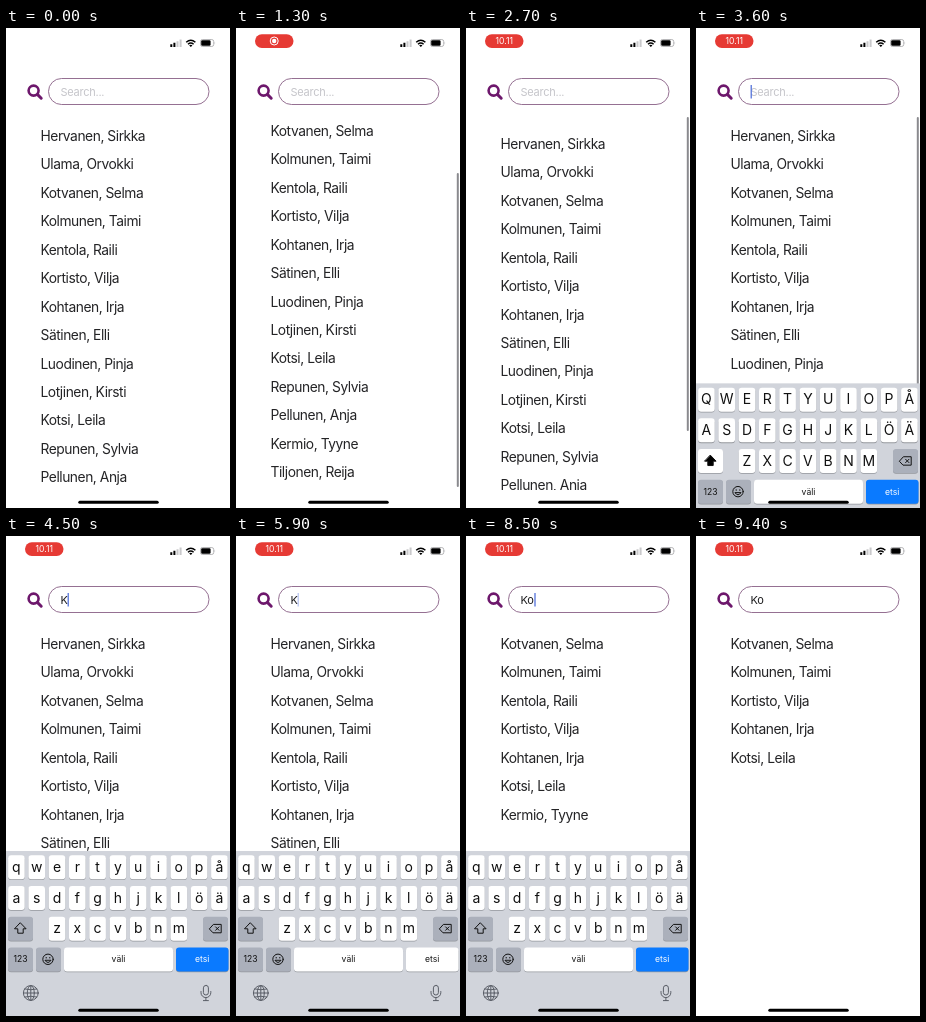
An HTML page for the animation above (9.5 s loop, 224 by 480 pixels).

```html
<!DOCTYPE html>
<html lang="fi">
<head>
<meta charset="utf-8">
<title>Name search</title>
<style>
  html, body { margin: 0; width: 100%; height: 100%; overflow: hidden; background: #fff; }
  svg { display: block; }
  #stage { width: 100vw; height: 100vh; font-family: Inter, Roboto, sans-serif; }
  #list { font-size: 13.8px; letter-spacing: -.45px; fill: #242426; }
  #query { font-size: 11px; letter-spacing: -.25px; }
  .center { text-anchor: middle; }
  .letter { font-size: 14px; fill: #111; }
  .label { font-size: 8.6px; fill: #111; }
  .line { fill: none; stroke: #111; stroke-linecap: round; stroke-linejoin: round; }
</style>
</head>
<body>
<svg id="stage" viewBox="0 0 224 480">
  <rect width="224" height="480" fill="#fff"/>

  <svg y="87.6" width="224" height="374.4" viewBox="0 87.6 224 374.4"><g id="list"></g></svg>
  <rect id="bar" x="220.8" width="2" rx="1" fill="#8a8a8e"/>

  <g fill="none" stroke="#6d176c">
    <circle cx="27.6" cy="62.6" r="5" stroke-width="2.6"/>
    <path d="M31.6 66.6l3.6 3.6" stroke-width="3" stroke-linecap="round"/>
    <rect x="42.5" y="50.5" width="160.5" height="26" rx="13" stroke="#8a6086" stroke-width=".9"/>
  </g>
  <text id="query" x="54.5" y="67.7"></text>
  <rect id="cursor" y="57" width="1.2" height="13.5" fill="#4668d8"/>

  <g id="pill">
    <rect x="19" y="6.3" width="38.5" height="13.6" rx="6.8" fill="#e63a34"/>
    <g id="recording" fill="#fff">
      <circle cx="38.2" cy="13" r="4" fill="none" stroke="#fff"/>
      <circle cx="38.2" cy="13" r="2.2"/>
    </g>
    <text id="clock" class="center" x="38.2" y="16.3" font-size="8.6" fill="#fff">10.11</text>
  </g>

  <g>
    <path d="M164.3 16.2h2v2.8h-2zM167.4 14.8h2v4.2h-2z"/>
    <path d="M170.5 13.2h2v5.8h-2zM173.6 11.6h2v7.4h-2z" fill="#c9c9cb"/>
    <g fill="none" stroke="#000" stroke-width="1.5">
      <path d="M180.2 14.2q4.6-4 9.2 0M182 16.2q2.8-2.4 5.6 0"/>
    </g>
    <path d="M183.2 17.4q1.6-1.3 3.2 0l-1.6 1.7z"/>
    <rect x="194.5" y="11.5" width="13.2" height="7" rx="2" fill="none" stroke="#a5a5a8" stroke-width=".8"/>
    <rect x="195.2" y="12.2" width="9.4" height="5.6" rx="1.2"/>
    <path d="M208.6 13.7q1.2 1.3 0 2.6z" fill="#a5a5a8"/>
  </g>

  <g id="keyboard">
    <rect y="315" width="224" height="175" fill="#d1d4db"/>
    <g id="keys"></g>
    <path id="shift" class="line" d="M14.5 387l5.6 5.8h-2.9v4.4h-5.4v-4.4h-2.9z" stroke-width="1"/>
    <g class="line" stroke-width="1">
      <path d="M203.6 392.6l3.8-4.2h7.8v8.4h-7.8zM209.6 390.9l3.4 3.4m0-3.4l-3.4 3.4"/>
      <circle cx="42" cy="423.3" r="5.2"/>
      <path d="M39.2 424.6q2.8 4 5.6 0zM40.2 421.4v.6M43.8 421.4v.6"/>
    </g>
    <g class="line" stroke-width="1" style="stroke:#5b5f68">
      <circle cx="24.8" cy="457" r="7.4"/>
      <ellipse cx="24.8" cy="457" rx="3.5" ry="7.4"/>
      <path d="M17.4 457h14.8M24.8 449.6v14.8M18.8 453q6 1.6 12 0M18.8 461q6-1.6 12 0"/>
      <rect x="197.4" y="449.4" width="5" height="9.6" rx="2.5"/>
      <path d="M195 455.5v1.2a4.9 4.9 0 0 0 9.8 0v-1.2M199.9 461.6v3M197.4 464.6h5"/>
    </g>
  </g>
  <rect x="72.3" y="472.7" width="80.4" height="3" rx="1.5"/>
</svg>

<script>
const LOOP = 9500;
const MAX_SCROLL = 54;
const TRAVEL = 172;
const names = [
  "Hervanen, Sirkka", "Ulama, Orvokki", "Kotvanen, Selma", "Kolmunen, Taimi",
  "Kentola, Raili", "Kortisto, Vilja", "Kohtanen, Irja", "Sätinen, Elli",
  "Luodinen, Pinja", "Lotjinen, Kirsti", "Kotsi, Leila", "Repunen, Sylvia",
  "Pellunen, Anja", "Kermio, Tyyne", "Tiljonen, Reija"
];
// Each visit to the search field: focus, typing, search key, resulting text.
const visits = [
  { focus: 3485, type: 4330, press: 5830, submit: 5950, text: "K" },
  { focus: 7565, type: 8430, press: 8840, submit: 8940, text: "Ko" }
];
const scrollKeys = [[1030, 0], [1300, 62], [1720, 54], [2280, 54], [2680, -8], [3050, 0]];
const cursorX = [54.6, 61.6, 68.4];

const $ = id => document.getElementById(id);
const clamp = (v, lo = 0, hi = 1) => Math.min(hi, Math.max(lo, v));
const set = (id, attrs) => {
  for (const name in attrs) $(id).setAttribute(name, attrs[name]);
};

function key(x, y, width, color, content, id = "") {
  return `<rect x="${x}" y="${y - 11.2}" width="${width}" height="24" rx="3" fill="#94979d"/>` +
    `<rect id="${id}" x="${x}" y="${y - 12}" width="${width}" height="24" rx="3" fill="${color}"/>` + content;
}

function label(x, y, text, id = "") {
  return `<text id="${id}" class="label center" x="${x}" y="${y + 3}">${text}</text>`;
}

function buildKeyboard() {
  let out = "";
  ["qwertyuiopå", "asdfghjklöä", "zxcvbnm"].forEach((row, r) => {
    [...row].forEach((char, i) => {
      const x = 10.4 + 20.3 * (i + (r === 2 ? 2 : 0)), y = 331.3 + 30.7 * r;
      out += key(x - 8.3, y, 16.6, "#fff",
        `<text class="letter center" x="${x}" y="${y + 4.5}">${char}</text>`);
    });
  });
  const gray = "#abb0bb", bottom = 423.4;
  out += key(2, 392.7, 25, gray, "", "shiftKey") + key(197, 392.7, 25, gray, "");
  out += key(2, bottom, 25, gray, label(14.5, bottom, "123"));
  out += key(30, bottom, 25, gray, "");
  out += key(58, bottom, 109, "#fff", label(112.5, bottom, "väli"));
  out += key(170, bottom, 52.5, "#fff", label(196.2, bottom, "etsi", "searchLabel"), "searchKey");
  $("keys").innerHTML = out;
}

function scrollAt(t) {
  let value = 0;
  for (let i = 1; i < scrollKeys.length; i++) {
    const [t0, a] = scrollKeys[i - 1], [t1, b] = scrollKeys[i];
    const p = clamp((t - t0) / (t1 - t0));
    value += (b - a) * p * p * (3 - 2 * p);
  }
  return value;
}

function keyboardOffset(t, visit) {
  const settle = start => Math.exp(-Math.max(0, t - start) / 80);
  if (!visit) return TRAVEL;
  return TRAVEL * (t < visit.submit ? settle(visit.focus) : 1 - settle(visit.submit));
}

function cursorOpacity(t, visit) {
  if (!visit || t >= visit.submit) return 0;
  const phase = (t - (t < visit.type ? visit.focus : visit.type)) % 1000;
  return phase < 500 ? 1 : Math.max(1 - (phase - 500) / 120, (phase - 880) / 120, 0);
}

function drawList(filter) {
  if ($("list").dataset.filter === filter) return;
  $("list").dataset.filter = filter;
  $("list").innerHTML = names.filter(name => name.startsWith(filter))
    .map((name, i) => `<text x="34.5" y="${112.9 + 28.45 * i}">${name}</text>`).join("");
}

function render(t) {
  const visit = visits.filter(v => t >= v.focus).pop();
  const last = test => (visits.filter(test).pop() || { text: "" }).text;
  const text = last(v => t >= v.type);
  drawList(last(v => t >= v.submit));

  const scroll = scrollAt(t), inside = clamp(scroll, 0, MAX_SCROLL);
  const excess = Math.abs(scroll - inside);
  set("list", { transform: `translate(0 ${-scroll})` });
  set("bar", {
    y: 89 + 48 * inside / MAX_SCROLL + (scroll > inside ? excess : 0),
    height: 322 - excess,
    opacity: t < 1050 ? 0 : clamp((3950 - t) / 250)
  });

  $("query").textContent = text || "Search...";
  set("query", { fill: text ? "#1c1c1e" : "#c5c5ca" });
  set("cursor", { x: cursorX[text.length], opacity: cursorOpacity(t, visit) });

  set("pill", { opacity: clamp((t - 40) / 260) });
  set("recording", { opacity: t < 2700 ? 1 : 0 });
  set("clock", { opacity: t < 2700 ? 0 : 1 });

  const pressed = visit && t >= visit.press && t < visit.submit;
  set("keyboard", { transform: `translate(0 ${keyboardOffset(t, visit)})` });
  $("keys").style.textTransform = text ? "none" : "uppercase";
  document.querySelectorAll(".label").forEach(item => item.style.textTransform = "none");
  set("shiftKey", { fill: text ? "#abb0bb" : "#fff" });
  $("shift").style.fill = text ? "none" : "#000";
  set("searchKey", { fill: pressed ? "#fff" : "#0a7aff" });
  $("searchLabel").style.fill = pressed ? "#111" : "#fff";
}

buildKeyboard();
const start = performance.now();
function tick() {
  render((performance.now() - start) % LOOP);
  requestAnimationFrame(tick);
}
tick();
</script>
</body>
</html>
```
